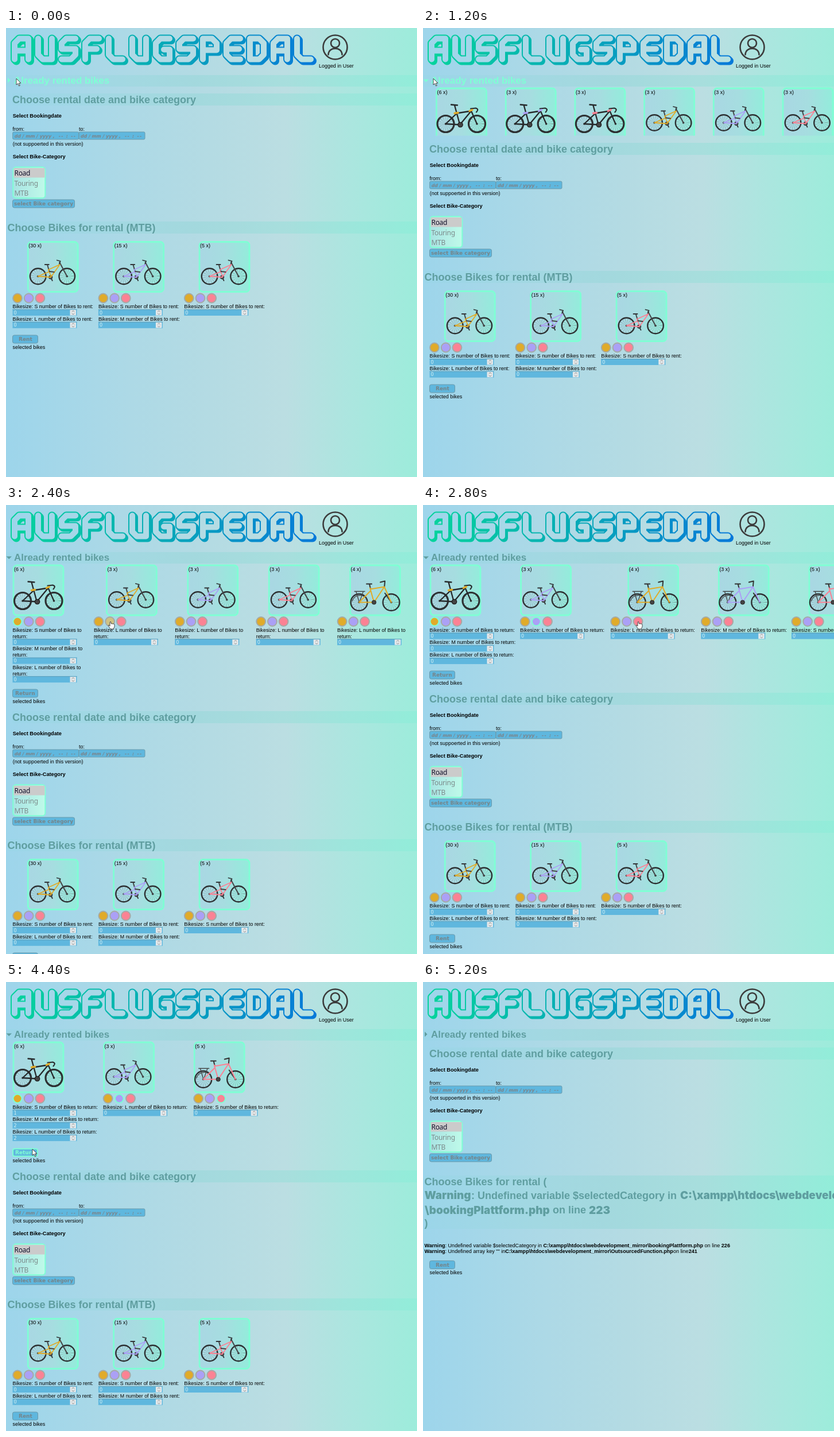
Recreate the animation shown at these times as an HTML page. Size 716x782 px, loop 5.6 s.

```html
<!DOCTYPE html>
<html lang="en">
<head>
<meta charset="utf-8">
<title>Bike rental</title>
<style>
html, body { margin: 0; width: 100%; height: 100%; overflow: hidden; }
svg { display: block; width: 716px; height: 782px; }
text { font: 8.95px "Liberation Sans", Arial, sans-serif; dominant-baseline: central; white-space: pre; }
.label { font-size: 8.87px; }
.warn { font-size: 9.08px; }
.bold { font-weight: bold; }
.h4 { font-weight: bold; font-size: 9.2px; }
.h2 { font-weight: bold; font-size: 18px; fill: #5f9ea0; }
.sum { font-weight: bold; font-size: 16.9px; }
.black { font: 900 18.9px Inter, Roboto, sans-serif; fill: #5f9ea0; }
.btn { font: bold 9px "DejaVu Sans", sans-serif; }
.date { font: italic bold 7.8px "DejaVu Sans", sans-serif; fill: #7d8388; }
.opt { font: 12px "Noto Sans", sans-serif; letter-spacing: -.3px; }
.num { font: 8px "DejaVu Sans", sans-serif; fill: #d9f3f4; }
.line { fill: none; stroke-linejoin: round; stroke-linecap: round; }
</style>
</head>
<body>
<svg viewBox="0 0 716 782">
  <defs>
    <linearGradient id="bg" gradientUnits="userSpaceOnUse" x2="716" y2="0">
      <stop stop-color="#9dd5eb"/><stop offset=".3" stop-color="#add9e6"/>
      <stop offset=".5" stop-color="#b4dbe3"/><stop offset=".68" stop-color="#bbdee2"/>
      <stop offset=".84" stop-color="#abe6df"/><stop offset="1" stop-color="#9decdb"/>
    </linearGradient>
    <linearGradient id="ink" gradientUnits="userSpaceOnUse" x1="8" x2="540" y2="0">
      <stop stop-color="#05d49c"/><stop offset=".5" stop-color="#07a9b8"/><stop offset="1" stop-color="#0779d9"/>
    </linearGradient>
    <linearGradient id="bar" gradientUnits="userSpaceOnUse" x2="716" y2="0">
      <stop stop-color="#7fd8d4" stop-opacity=".08"/><stop offset=".45" stop-color="#7fd4d0" stop-opacity=".3"/>
      <stop offset="1" stop-color="#7feed6" stop-opacity=".36"/>
    </linearGradient>
    <linearGradient id="card">
      <stop stop-color="#a9d7e3"/><stop offset=".5" stop-color="#a6dde0"/><stop offset="1" stop-color="#93ecdb"/>
    </linearGradient>
    <linearGradient id="list">
      <stop stop-color="#a9e3e3"/><stop offset="1" stop-color="#bffae9"/>
    </linearGradient>
    <clipPath id="panel"><rect id="panelBox" y="101.5" width="716"/></clipPath>
  </defs>
  <rect width="716" height="782" fill="url(#bg)"/>
  <g id="view"></g>
</svg>
<script>
const STEP = 400, STATES = 14;
const AQUA = '#7fffd4', TEAL = '#5f9ea0', BLUE = '#5fb7de', GREY = '#76858a';
const GOLD = '#e0ab2a', LILAC = '#aba0f6', PINK = '#fb8294';
const COLORS = [GOLD, LILAC, PINK];
const SHIFT = [0, 3, 33, 86, 140, 245, 245, 213, 213, 214, 213, 214, 0, 0];

const view = document.getElementById('view');
const panelBox = document.getElementById('panelBox');

const text = (x, y, s, cls = '', fill = '') =>
  `<text x="${x}" y="${y}" class="${cls}"${fill && ` style="fill:${fill}"`}>${s}</text>`;
const rect = (x, y, w, h, fill, stroke = 'none', sw = 1, r = 0) =>
  `<rect x="${x}" y="${y}" width="${w}" height="${h}" fill="${fill}" stroke="${stroke}" stroke-width="${sw}" rx="${r}"/>`;
const circle = (x, y, r, fill, stroke, sw, extra = '') =>
  `<circle cx="${x}" cy="${y}" r="${r}" fill="${fill}" stroke="${stroke}" stroke-width="${sw}" ${extra}/>`;
const line = (d, stroke, sw) => `<path class="line" d="${d}" stroke="${stroke}" stroke-width="${sw}"/>`;
const group = (x, y, s) => `<g transform="translate(${x} ${y})">${s}</g>`;

const GLYPHS = {
  A: 'M0 36V8L8 0H24V36M0 21H24',
  U: 'M0 0V28L8 36H24V0',
  S: 'M24 0H8L0 8V18H24V28L16 36H0',
  F: 'M24 0H8L0 8V36M0 18H20',
  L: 'M0 0V28L8 36H24',
  G: 'M24 0H8L0 8V28L8 36H24V19H14',
  P: 'M0 36V0H16L24 8V20H0',
  E: 'M24 0H8L0 8V28L8 36H24M0 18H22',
  D: 'M0 0H16L24 8V28L16 36H0Z'
};

// Moves a glyph path to absolute coordinates so one gradient spans the word.
const place = (d, dx, dy) => d.replace(/([MLHV])([\d. ]+)/g, (_, c, n) => {
  const [a, b] = n.trim().split(' ').map(Number);
  return c === 'H' ? c + (a + dx) : c === 'V' ? c + (a + dy) : `${c}${a + dx} ${b + dy}`;
});

function wordmark() {
  const word = (dx, dy) => [...'AUSFLUGSPEDAL']
    .map((c, i) => place(GLYPHS[c], 15 + i * 41 + dx, 18.5 + dy)).join('');
  return [3, 2, 1, 0].map(k => line(word(k, k), 'url(#ink)', 14)).join('') +
    line(word(0, 0), 'url(#bg)', 10);
}

const header = wordmark() +
  circle(573.5, 33.5, 21, 'none', '#3b3b3b', 2.6) +
  circle(573.5, 26.5, 7.5, 'none', '#3b3b3b', 2.6) +
  line('M561.5 46.5C562 32 585 32 585.5 46.5', '#3b3b3b', 2.6) +
  text(545, 66, 'Logged in User');

const wheel = (x, y, r, sw = 2.4) => circle(x, y, r, 'none', '#2c2f31', sw) +
  circle(x, y, r / 2, 'none', '#555', r, 'stroke-dasharray=".4 2.4" opacity=".45"') +
  circle(x, y, 1.8, '#333', 'none', 0);

const BIKES = {
  mtb: c => wheel(19, 61.5, 13.8) + wheel(69.5, 61.5, 13.8) +
    line('M35.5 42L39 54M56.5 37L69.5 61.5', '#44484a', 2) +
    line('M31 41H38M52 33.5L58 35 56 40M41 63L44 69', '#33373a', 1.8) +
    circle(41, 63, 3.2, '#555', '#2c2f31', 1) +
    line('M37 50L57 41 42 62 37 50M19 61.5L37 54M19 61.5L41 63', c, 1.8) +
    line('M39 53L47 54', '#444', 2),
  road: c => wheel(17.5, 63.5, 14.5, 3.2) + wheel(72, 63.5, 14.5, 3.2) +
    line('M27 30L38 31M33 31L42 64M37 45L62 41 43 64M17.5 63.5L36 46M17.5 63.5L43 65M62 41L72 63.5', '#26292b', 2.3) +
    line('M61 37L70 36Q76 38 71 43', '#26292b', 2.2) +
    line('M33 45L39 44M59 41L64 39', c, 3.4) +
    circle(43, 65, 4.2, '#444', '#1c1c1c', 1.3),
  touring: c => wheel(17, 66, 14.5) + wheel(73, 66, 14.5) +
    line('M9 47H27M12 48L17 65M24 48L18 65M5 64A14 14 0 0 1 30 60', '#444', 1.3) +
    line('M30 34H39M35 34L37 43M54 31L62 29 61 40M62 50L73 66', '#333', 2) +
    line('M37 43L61 39 43 66 36 41M17 66L37 46M17 66H43M61 39L73 66', c, 2) +
    circle(43, 66, 3.6, '#444', '#222', 1)
};

const card = (x, y, kind, color, count) => group(x, y,
  rect(1.5, 1.5, 87, 87, 'url(#card)', AQUA, 2.8, 6) +
  BIKES[kind](color) + text(2.5, 8, `(${count} x)`));

const dot = (x, y, color, on) => on
  ? circle(x, y, 7.5, color, AQUA, 2)
  : circle(x, y, 7.9, color, '#a5aaa6', 2);

const numberBox = (x, y, value) =>
  rect(x, y - 5.5, 112, 11, BLUE) + rect(x, y - 5.5, 112, 1, '#5c9db8') +
  text(x + 2, y + .5, value, 'num') +
  rect(x + 100, y - 4.5, 10.5, 9.5, '#e4e8ea') +
  line(`M${x + 103.5} ${y - 1.3}l2 -1.8 2 1.8m-4 3l2 1.8 2 -1.8`, '#777', .8);

const button = (y, label, tx, w, on) =>
  rect(11.5 + on / 2, y - 7 + on / 2, w - on, 14 - on, BLUE, on ? AQUA : '#6b9aab', on ? 2 : 1, 3) +
  text(tx, y + .3, label, 'btn', on ? AQUA : GREY);

const bar = (x, y, h = 21) => rect(x, y - 10.5, 716 - x, h, 'url(#bar)');

// One bike: card, colour dots and a number field per size; tail holds the label's line ends.
function column(x, y, w, bike, tail) {
  const { kind, color, count, sizes, sel = -1, hover = -1, values = [] } = bike;
  const pitch = tail.length > 1 ? 32.5 : 21.8;
  let out = card(sel < 0 ? x + (w - 90) / 2 : x, y, kind, COLORS[color], count);
  COLORS.forEach((c, i) => {
    out += dot(x + 8.5 + i * 19.7, y + 99.5, i === hover ? '#d0c283' : c, i === sel);
  });
  [...sizes].forEach((size, i) => {
    const top = y + 114 + i * pitch;
    out += text(x, top, `Bikesize: ${size} number of Bikes${tail[0]}`, 'label');
    if (tail[1]) out += text(x, top + 11, tail[1], 'label');
    out += numberBox(x, top + pitch - 11.3, values[i] || 0);
  });
  return out;
}

const bike = (kind, color, count, sizes, extra) => ({ kind, color, count, sizes, ...extra });

function rentedBikes(s) {
  const mtbs = [0, 1, 2].map(c => bike('mtb', c, 3, 'L'));
  const first = bike('road', 0, 6, 'SML', { sel: 0, values: s > 9 ? [1, 2, 2] : [] });
  if (s < 6) return {
    pitch: 120.7, w: 111, tail: ['', 'to return:'],
    list: [bike('road', 0, 6, 'SML'), bike('road', 1, 3, 'S'), bike('road', 2, 3, 'L'), ...mtbs]
  };
  if (s === 6) {
    mtbs[0].hover = 1;
    return { pitch: 141.4, w: 132, tail: [' to', 'return:'], list: [first, ...mtbs, bike('touring', 0, 4, 'L')] };
  }
  const list = [first, bike('mtb', 1, 3, 'L', { sel: 1 })];
  if (s === 7) list.push(bike('touring', 0, 4, 'L'), bike('touring', 1, 3, 'M'), bike('touring', 2, 5, 'S'));
  else list.push(bike('touring', 2, 5, 'S', { sel: 2 }));
  return { pitch: 157.6, w: 149, tail: [' to return:'], list };
}

function rentedPanel(s) {
  const { pitch, w, tail, list } = rentedBikes(s);
  const end = s < 7 ? 245 : SHIFT[s];
  return '<g clip-path="url(#panel)">' +
    list.map((b, i) => column(11.5 + i * pitch, 103.5, w, b, tail)).join('') +
    button(end + 83, 'Return', 16, 44, s === 9 || s === 11 ? 1 : 0) +
    text(11.5, end + 96.7, 'selected bikes') + '</g>';
}

const dateBox = x => rect(x, 181, 115, 13, BLUE, '#6b9aab', 1, 2) +
  text(x + 3, 188, 'dd / mm / yyyy ,', 'date') +
  `<g letter-spacing="1.3">${text(x + 80, 188, '-- : --', 'date')}</g>`;

const bookingForm = bar(11, 124.5) + text(11, 124.5, 'Choose rental date and bike category', 'h2') +
  text(11.7, 153, 'Select Bookingdate', 'h4') +
  text(11.5, 175.5, 'from:') + text(127, 175.5, 'to:') + dateBox(11.7) + dateBox(127) +
  text(11.7, 201.5, '(not suppoerted in this version)') +
  text(11.7, 224, 'Select Bike-Category', 'h4') +
  rect(12.3, 242.3, 56, 54, 'url(#list)', AQUA, 2, 5) + rect(13.5, 244, 54, 16.5, '#cbcbcb') +
  text(14.5, 252.8, 'Road', 'opt', '#10102a') + text(14.5, 270.2, 'Touring', 'opt', '#7d8c8c') +
  text(14.5, 287.4, 'MTB', 'opt', '#7d8c8c') +
  button(306, 'select Bike category', 14, 108, 0);

const rentEnd = y => button(y, 'Rent', 22, 44, 0) + text(11.5, y + 13.5, 'selected bikes');

const rentForm = bar(3, 347.5) + text(2.5, 347.5, 'Choose Bikes for rental (MTB)', 'h2') +
  [bike('mtb', 0, 30, 'SL'), bike('mtb', 1, 15, 'SM'), bike('mtb', 2, 5, 'S')]
    .map((b, i) => column(11.5 + i * 149.4, 371, 140.5, b, [' to rent:'])).join('') +
  rentEnd(542);

const strong = s => `<tspan class="bold">${s}</tspan>`;
const DIR = String.raw`C:\xampp\htdocs\webdevelopment_mirror`;
const errorForm = bar(3, 347.5, 93) + text(2.5, 347.5, 'Choose Bikes for rental (', 'h2') +
  text(2.5, 371.5, 'Warning', 'black') +
  text(84, 371.5, ': Undefined variable $selectedCategory in', 'h2') +
  text(448, 371.5, DIR, 'black') +
  text(3, 397, '\\bookingPlattform.php', 'black') +
  text(226, 397, 'on line', 'h2') + text(289, 397, '223', 'black') + text(2.5, 420, ')', 'h2') +
  text(2.5, 458.5, strong('Warning') + ': Undefined variable $selectedCategory in ' +
    strong(DIR + '\\bookingPlattform.php') + ' on line ' + strong('226'), 'warn') +
  text(2.5, 469, strong('Warning') + ': Undefined array key "" in' +
    strong(DIR + '\\OutsourcedFunction.php') + 'on line' + strong('241'), 'warn') +
  rentEnd(492.5);

const ARROW = '<path d="M0 0V11L2.6 8.7 4.6 13 6.3 12.2 4.4 8H8Z" fill="#fff" stroke="#222" stroke-width=".8"/>';
const HAND = '<path d="M-1 1V8L-3 6-4 7 0 13H5L7 9V5Q5 3 3 4L1 3.5V1Q0 -1 -1 1Z" fill="#fff" stroke="#222" stroke-width=".8"/>';

function cursor(s) {
  if (s < 5) return group(18, 88, ARROW);
  if (s < 8) return group([20, 182, 375][s - 5], 203, HAND);
  if (s === 8) return group(41, 290, ARROW);
  if (s === 9) return group(98, 237, ARROW);
  return s < 12 ? group(46, 291, ARROW) : '';
}

function summary(s) {
  const color = s < 5 ? AQUA : TEAL;
  const mark = s > 0 && s < 12 ? 'M.5 89.5H10L5.2 94.3Z' : 'M3 86.5L7.5 91 3 95.5Z';
  return bar(0, 92.5, 20) + `<path d="${mark}" fill="${color}"/>` +
    text(14, 91.8, 'Already rented bikes', 'sum', color);
}

function render(s) {
  if (s === 12) return view.replaceChildren(); // page reloading
  panelBox.setAttribute('height', SHIFT[s]);
  view.innerHTML = header + summary(s) + (SHIFT[s] ? rentedPanel(s) : '') +
    group(0, SHIFT[s], bookingForm + (s === 13 ? errorForm : rentForm)) + cursor(s);
}

let shown = -1;
function tick() {
  const s = Math.floor(performance.now() / STEP) % STATES;
  if (s !== shown) render(shown = s);
  requestAnimationFrame(tick);
}
tick();
</script>
</body>
</html>
```
